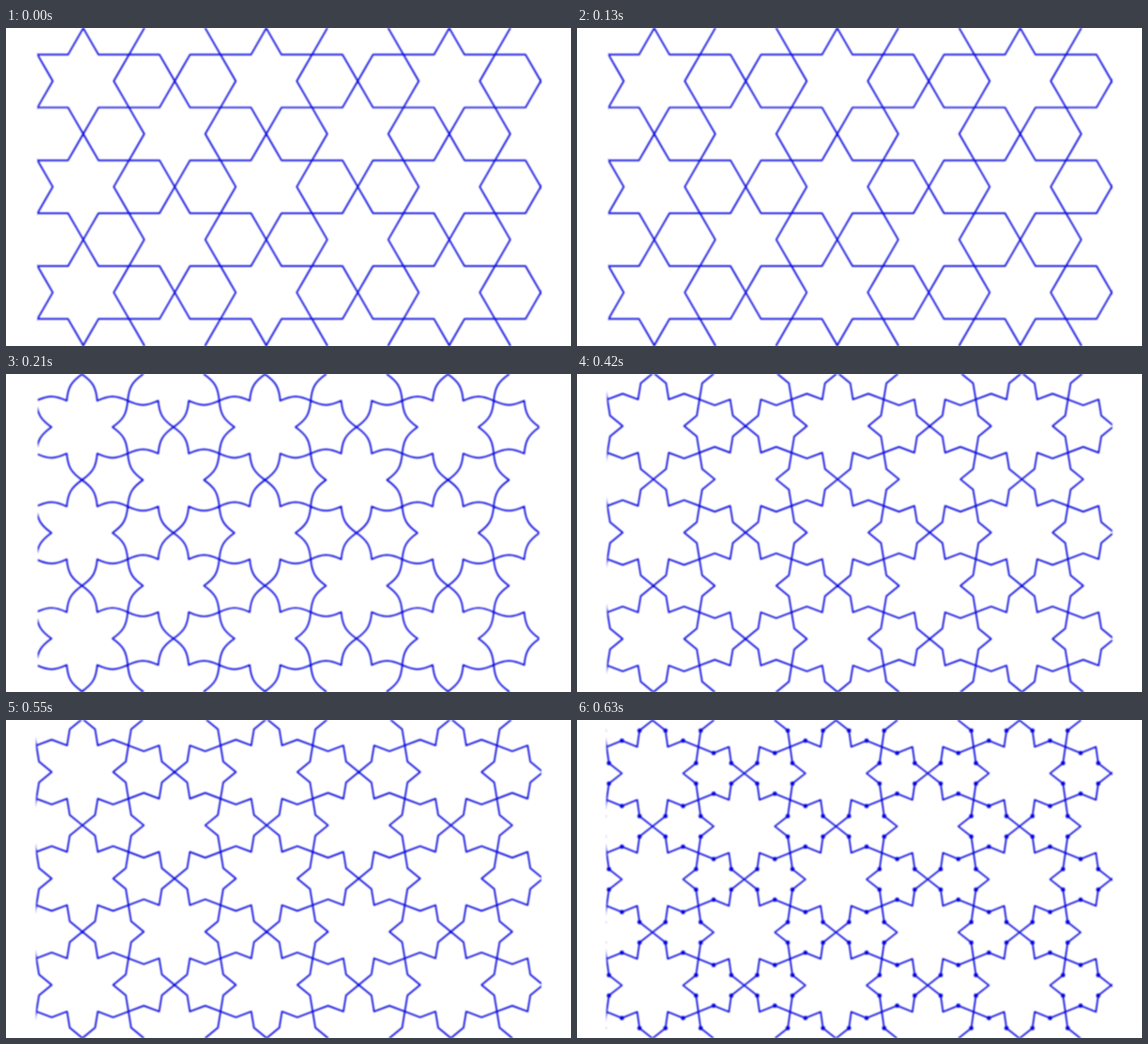
Animation, 800 px wide and 450 px high, one loop 0.84 s. Source, as an HTML page with a canvas:

```html
<!DOCTYPE html>
<html lang="en">
<head>
<meta charset="utf-8">
<title>Star tiling</title>
<style>
html, body { margin: 0; width: 100%; height: 100%; overflow: hidden; background: #fff; }
canvas { display: block; filter: blur(0.8px); }
</style>
</head>
<body>
<canvas id="stage" width="800" height="450"></canvas>
<script>
const ctx = document.getElementById('stage').getContext('2d');
const STEP = 210;

// size: distance between star centres; x, y: first centre; bulge: push on each edge's middle
const poses = [
  { size: 149.6, x: 109.4, y: 75.1, left: 44.5, right: 758, bulge: 0 },
  { size: 149.6, x: 107.6, y: 75.2, left: 45, right: 755, bulge: 6, curved: true },
  { size: 150.6, x: 108.2, y: 73.7, left: 42.5, right: 758, bulge: 8.2 },
  { size: 150, x: 106.9, y: 75.5, left: 41.5, right: 758, bulge: 8.7, dots: true }
];

function polar([cx, cy], r, deg) {
  const a = deg * Math.PI / 180;
  return [cx + r * Math.cos(a), cy + r * Math.sin(a)];
}

const mix = (a, b, k) => [a[0] + (b[0] - a[0]) * k, a[1] + (b[1] - a[1]) * k];

function star(center, pose, lines, dots) {
  const outer = pose.size / 2, inner = outer / Math.sqrt(3);
  // one edge between a tip and an inner corner, pushed outward along its normal
  const edge = (from, to, normal) => {
    const pushed = (k, r) => polar(mix(from, to, k), r, normal);
    const mid = pushed(0.5, pose.bulge);
    if (pose.curved) {
      const r = pose.bulge * 4 / 3;
      lines.bezierCurveTo(...pushed(0.4, r), ...pushed(0.6, r), ...to);
    } else {
      lines.lineTo(...mid);
      lines.lineTo(...to);
    }
    dots.moveTo(...mid);
    dots.arc(...mid, 3, 0, 7);
  };
  lines.moveTo(...polar(center, outer, -90));
  for (let a = -90; a < 270; a += 60) {
    const tip = polar(center, outer, a);
    const corner = polar(center, inner, a + 30);
    const next = polar(center, outer, a + 60);
    edge(tip, corner, a + 60);
    edge(corner, next, a);
  }
  lines.closePath();
}

function draw(pose) {
  const lines = new Path2D(), dots = new Path2D();
  const column = pose.size * Math.sqrt(3) / 2;
  for (let i = -1; i <= 5; i++) {
    for (let j = -1; j <= 3; j++) {
      star([pose.x + i * column, pose.y + (j + (i & 1) / 2) * pose.size], pose, lines, dots);
    }
  }
  ctx.fillStyle = '#fff';
  ctx.fillRect(0, 0, 800, 450);
  ctx.save();
  ctx.beginPath();
  ctx.rect(pose.left, 0, pose.right - pose.left, 450);
  ctx.clip();
  ctx.strokeStyle = ctx.fillStyle = '#0000dd';
  ctx.lineWidth = 2.2;
  ctx.lineJoin = 'round';
  ctx.stroke(lines);
  if (pose.dots) ctx.fill(dots);
  ctx.restore();
}

const start = performance.now();
function tick() {
  const time = Math.max(0, performance.now() - start);
  draw(poses[Math.floor(time / STEP) % poses.length]);
  requestAnimationFrame(tick);
}
tick();
</script>
</body>
</html>
```
